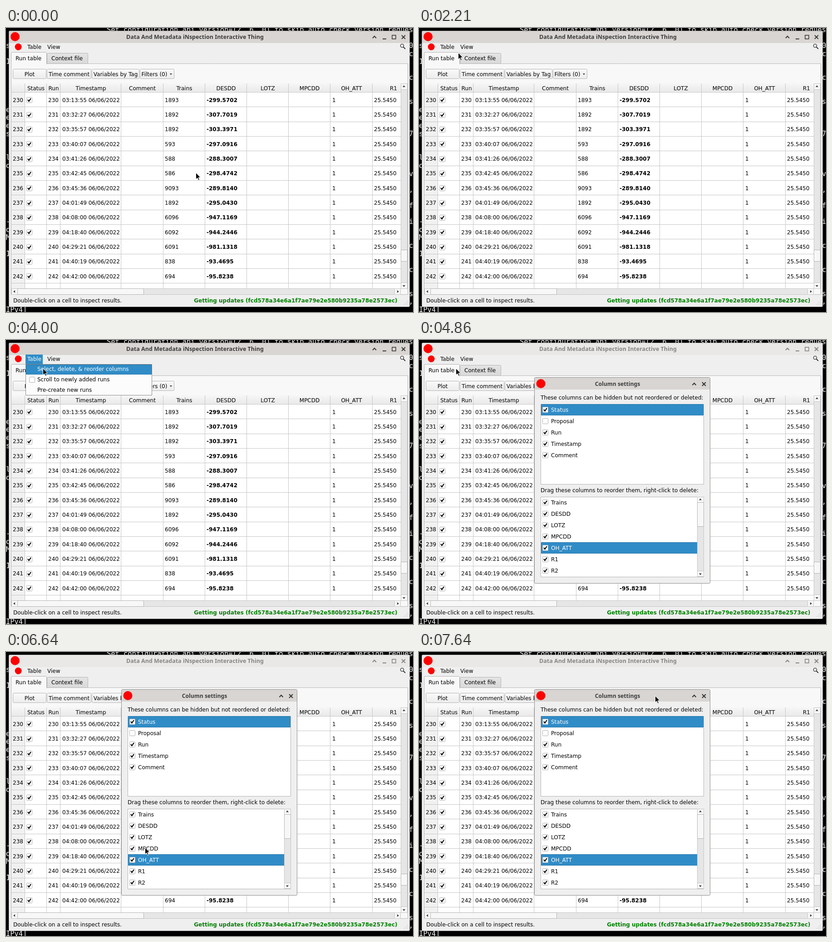
These frames come from a looping animation (897 px wide and 625 px high, 8000 ms). An HTML page with a canvas:

```html
<!DOCTYPE html>
<html lang="en">
<head>
<meta charset="utf-8">
<title>Run table</title>
<style>
html, body { margin: 0; width: 100%; height: 100%; overflow: hidden; background: #000; }
canvas { display: block; }
</style>
</head>
<body>
<canvas id="stage" width="897" height="625"></canvas>
<script>
const ctx = document.getElementById('stage').getContext('2d');
const LOOP = 8000;
const MENU_OPEN = 3070, DIALOG_OPEN = 4860;
const SANS = '12px "DejaVu Sans", sans-serif';
const BOLD = 'bold ' + SANS;
const MONO = '15.37px "DejaVu Sans Mono", monospace';
const titleFont = size => `bold ${size}px "Noto Sans", "Open Sans", sans-serif`;
const BLUE = '#308cc6', BLUE_EDGE = '#2878ab', RED = '#fe0000';
const PANEL = '#efefef', EDGE = '#b4b4b4', GRID = '#c6c6c6';
const TRACK = '#e6e6e6', TRACK_EDGE = '#c6c6c6', KNOB = '#f7f7f7';

// [left edge, title]; each column ends where the next one starts
const columns = [[42, 'Status'], [90, 'Run'], [120, 'Timestamp'], [254, 'Comment'], [347, 'Trains'],
  [439, 'DESDD'], [531, 'LOTZ'], [623, 'MPCDD'], [715, 'OH_ATT'], [808, 'R1'], [900, '']];

const runs = [
  ['03:13:55', '1893', '-299.5702'], ['03:32:27', '1892', '-307.7019'], ['03:35:57', '1892', '-303.3971'],
  ['03:40:07', '593', '-297.0916'], ['03:41:26', '588', '-288.3007'], ['03:42:45', '586', '-298.4742'],
  ['03:45:36', '9093', '-289.8140'], ['04:01:49', '1892', '-295.0430'], ['04:08:00', '6096', '-947.1169'],
  ['04:18:40', '6092', '-944.2446'], ['04:29:21', '6091', '-981.1318'], ['04:40:19', '838', '-93.4695'],
  ['04:42:00', '694', '-95.8238']];

// Pointer moves: start and end time, number of steps, from, to
const moves = [
  [1290, 1710, 7, [418, 318], [205, 190]],
  [2210, 2210, 1, [205, 190], [86, 54]],
  [2282, 2570, 5, [86, 54], [59, 31]],
  [3640, 4000, 6, [59, 31], [81, 62]],
  [5360, 6070, 11, [81, 62], [235, 356]],
  [6290, 6640, 6, [235, 356], [306, 430]],
  [6930, 7640, 11, [306, 430], [520, 96]]];

function pointerAt(t) {
  let pos = moves[0][3];
  for (const [start, end, steps, from, to] of moves) {
    if (t < start) break;
    const gap = (end - start) / (steps - 1) || 1;
    const p = Math.min(1, (Math.floor((t - start) / gap + 1e-6) + 1) / steps);
    const eased = p * (2 - p);
    pos = from.map((v, i) => Math.round(v + (to[i] - v) * eased));
  }
  return pos;
}

function rect(x, y, w, h, fill) {
  ctx.fillStyle = fill;
  ctx.fillRect(x, y, w, h);
}

function box(x, y, w, h, fill, edge = EDGE, radius = 0) {
  ctx.beginPath();
  ctx.roundRect(x + .5, y + .5, w - 1, h - 1, radius);
  ctx.fillStyle = fill;
  ctx.fill();
  ctx.strokeStyle = edge;
  ctx.lineWidth = 1;
  ctx.stroke();
}

function shade(y, h, top, bottom) {
  const g = ctx.createLinearGradient(0, y, 0, y + h);
  g.addColorStop(0, top);
  g.addColorStop(1, bottom);
  return g;
}

// y is the middle of the capitals
function text(s, x, y, { font = SANS, color = '#000', align = 'left' } = {}) {
  ctx.font = font;
  ctx.fillStyle = color;
  ctx.textAlign = align;
  ctx.fillText(s, x, y + 4.3);
}

function path(points, color, width = 1.8) {
  ctx.beginPath();
  points.forEach(([x, y]) => ctx.lineTo(x, y));
  ctx.strokeStyle = color;
  ctx.lineWidth = width;
  ctx.stroke();
}

function dot(x, y, r) {
  ctx.beginPath();
  ctx.arc(x, y, r, 0, 7);
  ctx.fillStyle = RED;
  ctx.fill();
}

function triangle(x, y, dx, dy, size = 3) {
  ctx.beginPath();
  ctx.moveTo(x + dx * size, y + dy * size);
  ctx.lineTo(x - dx + dy * size, y - dy + dx * size);
  ctx.lineTo(x - dx - dy * size, y - dy - dx * size);
  ctx.fillStyle = '#444';
  ctx.fill();
}

function checkbox(x, y, checked) {
  box(x - 6, y - 6, 13, 13, '#fff', '#b0b0b0', 1);
  if (checked) path([[x - 3, y], [x - .5, y + 3.3], [x + 3.8, y - 3.2]], '#000', 2.1);
}

const chevron = (x, y, c) => path([[x - 4, y + 2.2], [x, y - 2], [x + 4, y + 2.2]], c, 2);

function cross(x, y, c) {
  path([[x - 4, y - 4], [x + 4, y + 4]], c, 2);
  path([[x - 4, y + 4], [x + 4, y - 4]], c, 2);
}

function verticalBar(x, y, h, button, knobY, knobH) {
  box(x, y, 15, h, TRACK, TRACK_EDGE);
  box(x, y, 15, button, KNOB, TRACK_EDGE);
  box(x, y + h - button, 15, button, KNOB, TRACK_EDGE);
  box(x, knobY, 15, knobH, KNOB, EDGE);
  triangle(x + 7, y + button / 2, 0, -1);
  triangle(x + 7, y + h - button / 2, 0, 1);
}

function terminal() {
  const cell = 9.25, pitch = 17.6;
  const put = (s, col, row) => text(s, col * cell, 4.4 + row * pitch, { font: MONO, color: '#f4f4f4' });
  rect(0, 0, 897, 625, '#000');
  put('Set configuration api_version=(2, 6, 0) to skip auto check_version reques', 24, 0);
  const left = { 2: 's', 4: '1', 10: 'e', 11: 'e', 12: 'e', 13: 's', 16: 'l', 17: 'o',
    24: '-', 25: 'o', 26: 'M', 28: '1', 35: 'IPv4]' };
  const right = { 2: '0', 3: 'c', 6: 'c', 9: 's', 13: '7', 18: 'v', 20: ',', 22: 'f',
    24: 'i', 27: 'c', 30: 'c', 33: 's', 34: ',' };
  for (const row in left) put(left[row], 0, row);
  for (const row in right) put(right[row], 96, row);
}

function windowFrame(active) {
  const ink = active ? '#3c3c3c' : '#858585';
  box(6, 6, 884, 608, PANEL, active ? '#a5a29f' : '#bdbdbd', 2);
  rect(7, 7, 882, 26, active ? '#d8d5d2' : '#e9e8e6');
  dot(20, 19, 10);
  text('Data And Metadata iNspection Interactive Thing', 416.5, 20,
    { font: titleFont(12.5), color: ink, align: 'center' });
  chevron(812, 20, ink);
  rect(830, 23, 8, 2, ink);
  ctx.strokeStyle = ink;
  ctx.lineWidth = 1.6;
  ctx.strokeRect(851, 16, 8, 8);
  cross(876, 20, ink);
}

function menuBar(open) {
  dot(27, 41.5, 7.5);
  if (open) rect(43, 32, 38, 21, BLUE);
  text('Table', 47, 42, { color: open ? '#fff' : '#000' });
  text('View', 91, 42);
  ctx.beginPath();
  ctx.arc(873, 39, 3.6, 0, 7);
  ctx.strokeStyle = '#333';
  ctx.lineWidth = 1.3;
  ctx.stroke();
  path([[875.6, 41.6], [880, 46]], '#333', 2);
}

function tabsAndButtons() {
  box(11, 78, 875, 509, '#f8f8f8', '#b9b9b9');
  box(90, 55, 91, 24, shade(55, 24, '#e4e4e4', '#d9d9d9'), EDGE, 2);
  box(11, 53, 79, 28, '#f8f8f8', EDGE, 2);
  rect(12, 78, 77, 4, '#f8f8f8');
  text('Run table', 21, 66.5);
  text('Context file', 100, 67);
  for (const [x, w, label, mid] of [[15, 74, 'Plot', 52], [90, 98, 'Time comment', 139],
    [189, 105, 'Variables by Tag', 241.5], [295, 76, 'Filters (0)', 327]]) {
    box(x, 90, w, 22, shade(90, 22, '#fafafa', '#ececec'), EDGE, 2);
    text(label, mid, 101.5, { align: 'center' });
  }
  triangle(363.5, 101, 0, 1, 2.6);
}

function table() {
  const rowHeight = 32.33, top = 142;
  ctx.save();
  ctx.beginPath();
  ctx.rect(12, 122, 858, 452);
  ctx.clip();
  rect(12, 122, 858, 452, '#fff');
  rect(12, 122, 858, 20, shade(122, 20, '#f6f6f6', '#e9e9e9'));
  rect(12, top, 30, 432, '#f1f1f1');
  columns.slice(0, -1).forEach(([x, title], i) => {
    rect(x - 1, 122, 1, 452, GRID);
    text(title, (x + columns[i + 1][0]) / 2, 133, { align: 'center' });
  });
  rect(12, 141, 858, 1, GRID);
  for (let i = 0; i <= runs.length; i++) {
    const y = top + 16.3 + i * rowHeight, id = String(230 + i);
    rect(12, Math.round(top + (i + 1) * rowHeight) - 1, 858, 1, GRID);
    text(id, 26.5, y, { align: 'center' });
    checkbox(51, Math.round(y), true);
    if (!runs[i]) continue;
    const [time, trains, value] = runs[i];
    text(id, 93, y);
    text(time + ' 06/06/2022', 124, y);
    text(trains, 350, y);
    text(value, 442, y, { font: BOLD });
    text('1', 719, y);
    text('25.5450', 811, y);
  }
  ctx.restore();

  verticalBar(870, 122, 452, 14, 488, 26);
  box(12, 573, 858, 14, TRACK, TRACK_EDGE);
  box(12, 573, 14, 14, KNOB, TRACK_EDGE);
  box(856, 573, 14, 14, KNOB, TRACK_EDGE);
  box(25, 573, 279, 14, KNOB, EDGE);
  triangle(19, 580, -1, 0);
  triangle(863, 580, 1, 0);
}

function statusBar() {
  text('Double-click on a cell to inspect results.', 16, 600);
  text('Getting updates (fcd578a34e6a1f7ae79e2e580b9235a78e2573ec)', 862.5, 600,
    { font: BOLD, color: '#008000', align: 'right' });
  for (let i = 0; i < 4; i++)
    for (let j = 0; j <= i; j++) rect(885 - 3 * j, 600 + 3 * i - 1, 1, 1, '#b0b0b0');
}

function menu(hover) {
  box(43, 53, 279, 69, '#fcfcfc', '#8c8c8c');
  if (hover) box(44, 54, 277, 22, BLUE, BLUE_EDGE);
  text('Select, delete, & reorder columns', 69, 64, { color: hover ? '#fff' : '#000' });
  checkbox(57, 87, false);
  text('Scroll to newly added runs', 69, 87);
  text('Pre-create new runs', 69, 110);
}

function list(y, width, items, selected, unchecked) {
  box(268, y, 360, 177, '#fff', EDGE);
  items.forEach((item, i) => {
    const mid = y + 12.5 + 25 * i, on = item === selected;
    if (on) box(269, y + 25 * i, width, 25, BLUE, BLUE_EDGE);
    checkbox(278, Math.floor(mid), item !== unchecked);
    text(item, 291, mid, { color: on ? '#fff' : '#000' });
  });
}

function dialog() {
  box(254, 82, 388, 454, PANEL, '#8f8c89', 2);
  rect(255, 83, 386, 26, '#d8d5d2');
  dot(268.5, 96, 10);
  text('Column settings', 437.5, 96.7, { font: titleFont(12.2), color: '#3c3c3c', align: 'center' });
  chevron(606.5, 97, '#333');
  cross(628, 97, '#333');
  text('These columns can be hidden but not reordered or deleted:', 268, 127);
  list(141, 358, ['Status', 'Proposal', 'Run', 'Timestamp', 'Comment'], 'Status', 'Proposal');
  text('Drag these columns to reorder them, right-click to delete:', 268, 331);
  list(345, 345, ['Trains', 'DESDD', 'LOTZ', 'MPCDD', 'OH_ATT', 'R1', 'R2'], 'OH_ATT');
  verticalBar(613, 345, 176, 13, 357, 54);
}

function pointer([x, y]) {
  const shape = [[0, 0], [0, 14.5], [3.3, 11.4], [5.8, 16.8], [8, 15.8], [5.6, 10.6], [10, 10.4]];
  ctx.beginPath();
  shape.forEach(([dx, dy]) => ctx.lineTo(x + .5 + dx, y + .5 + dy));
  ctx.closePath();
  ctx.fillStyle = '#000';
  ctx.fill();
  ctx.strokeStyle = '#fff';
  ctx.lineWidth = 1;
  ctx.stroke();
}

function draw(t) {
  const pos = pointerAt(t);
  const menuOpen = t >= MENU_OPEN && t < DIALOG_OPEN;
  const dialogOpen = t >= DIALOG_OPEN;
  terminal();
  windowFrame(!dialogOpen);
  menuBar(menuOpen);
  tabsAndButtons();
  table();
  statusBar();
  if (menuOpen) menu(pos[1] >= 53);
  if (dialogOpen) dialog();
  pointer(pos);
}

function tick() {
  draw(performance.now() % LOOP);
  requestAnimationFrame(tick);
}
tick();
</script>
</body>
</html>
```
